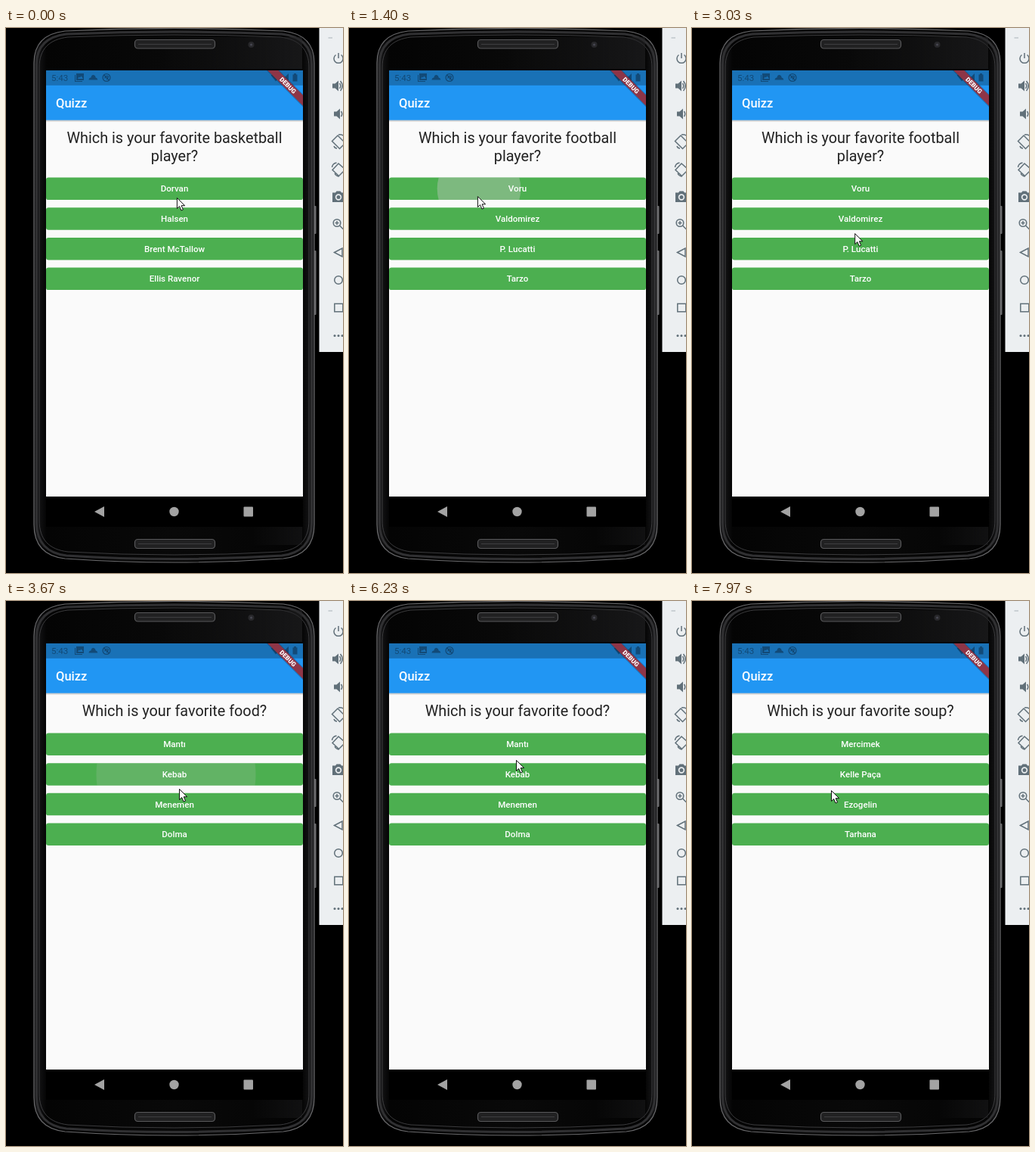
Write an HTML page that moves like this. It is 446 px wide and 720 px high and loops after 8000 ms.

```html
<!DOCTYPE html>
<html lang="en">
<head>
<meta charset="utf-8">
<title>Quizz</title>
<style>
html, body { margin: 0; width: 100%; height: 100%; overflow: hidden; background: #000; }
svg { display: block; width: 446px; height: 720px; }
text { font-family: Roboto, sans-serif; white-space: pre; }
.head { font-size: 19.83px; fill: #222; text-anchor: middle; }
.label { font-size: 11.57px; font-weight: 500; fill: #fff; text-anchor: middle; }
.tool { fill: none; stroke: #617079; stroke-width: 1.5; }
.solid { fill: #617079; }
.status { fill: #124a78; }
.thin { fill: none; stroke: #124a78; stroke-width: 1.3; }
</style>
</head>
<body>
<svg viewBox="0 0 446 720" xmlns="http://www.w3.org/2000/svg">
  <defs>
    <linearGradient id="body" x1="0" x2="1" y1="0" y2="0">
      <stop offset="0" stop-color="#1c1c1e"/>
      <stop offset=".045" stop-color="#040404"/>
      <stop offset=".5" stop-color="#090909"/>
      <stop offset=".955" stop-color="#040404"/>
      <stop offset="1" stop-color="#1c1c1e"/>
    </linearGradient>
    <linearGradient id="glare" x1="0" x2="1" y1="0" y2="0">
      <stop offset=".45" stop-color="#242426" stop-opacity="0"/>
      <stop offset="1" stop-color="#242426"/>
    </linearGradient>
    <linearGradient id="shade" x1="0" x2="0" y1="0" y2="1">
      <stop offset="0" stop-color="#555" stop-opacity=".4"/>
      <stop offset="1" stop-color="#555" stop-opacity="0"/>
    </linearGradient>
    <clipPath id="screen"><rect x="53" y="56" width="340" height="563"/></clipPath>
  </defs>
  <rect width="446" height="720"/>

  <!-- phone -->
  <g fill="#6c6c6e">
    <rect x="406" y="235" width="4.5" height="37" rx="1"/>
    <rect x="406" y="294" width="4.5" height="85" rx="1"/>
  </g>
  <path fill="url(#body)" stroke="#6a6a6c" stroke-width="1.2"
    d="M37 46C37 20 52 7 78 4Q222-3 367 4C393 7 408 20 408 46V656C408 684 393 698 367 701Q222 711 78 701C52 698 37 684 37 656Z"/>
  <path fill="none" stroke="#303032" stroke-width="3"
    d="M40.5 48C40.5 24 55 11 80 8Q222 2 365 8C390 11 404.5 24 404.5 48V654C404.5 680 390 694 365 697Q222 706 80 697C55 694 40.5 680 40.5 654Z"/>
  <path fill="none" stroke="#4a4a4c" stroke-width=".8"
    d="M44 52C44 28 57 15 82 12Q222 6 363 12C388 15 401 28 401 52V650C401 676 388 689 363 692Q222 700 82 692C57 689 44 676 44 650Z"/>
  <rect x="56" y="12" width="336" height="42" fill="url(#glare)" opacity=".6"/>
  <rect x="270" y="655" width="122" height="28" fill="url(#glare)" opacity=".4"/>
  <g fill="#212122" stroke="#58585a" stroke-width="1.2">
    <rect x="170.5" y="15.5" width="106" height="11.5" rx="4"/>
    <rect x="170.5" y="675.5" width="106" height="12" rx="4"/>
  </g>
  <path fill="none" stroke="#3e3e40" d="M175 21.5H272M175 681.5H272"/>
  <circle cx="324.5" cy="22" r="4" fill="#28282b"/>
  <circle cx="324.5" cy="22" r="1.6" fill="#464650"/>
  <rect x="53" y="619" width="340" height="40"/>
  <g fill="#a3a3a3">
    <path d="M117 639L130 632V646Z"/>
    <circle cx="222.5" cy="639" r="6.2"/>
    <rect x="314.5" y="632.5" width="12.5" height="13" rx="1"/>
  </g>

  <!-- app -->
  <g clip-path="url(#screen)">
    <rect x="53" y="56" width="340" height="563" fill="#fafafa"/>
    <rect x="53" y="121.5" width="340" height="3" fill="url(#shade)"/>
    <rect x="53" y="75" width="340" height="46.7" fill="#2196f3"/>
    <rect x="53" y="56" width="340" height="19.8" fill="#1971b6"/>
    <text x="66" y="104.9" font-size="16.53" font-weight="500" fill="#fff">Quizz</text>
    <g class="status">
      <text x="60" y="70" font-size="11.57">5:43</text>
      <path fill-rule="evenodd" d="M93 60H103V69H93ZM95 67H102L99.5 63.5L97.8 65.7L96.8 64.5ZM91 62H92V70H101V71H91Z"/>
      <path d="M109.5 68.5Q110 65.5 112.5 65.5Q113 61.5 116 62Q118.5 62.5 118.7 65.5Q121 66 121.3 68.5Z"/>
      <circle class="thin" cx="133" cy="65.5" r="4.9"/>
      <path class="thin" d="M129.5 62L136.5 69M130.5 66.5Q133 61.5 135.5 64.5L133 68"/>
      <path d="M350.5 62.5Q357 57.5 363.5 62.5L357 70.5Z"/>
      <path d="M374 60V70H364Z"/>
      <path d="M379.5 61.5H381V60H384V61.5H385.5V70.5H379.5Z"/>
    </g>
    <g id="page"></g>
    <g transform="translate(393 56) rotate(45)">
      <rect x="-34" y="22.3" width="68" height="11.8" fill="#000" opacity=".22"/>
      <rect x="-34" y="23.1" width="68" height="9.95" fill="#8e3547"/>
      <text y="31" text-anchor="middle" font-size="8.4" font-weight="900" fill="#fff">DEBUG</text>
    </g>
  </g>

  <!-- emulator toolbar -->
  <rect x="414.5" width="31.5" height="428" fill="#eceff1"/>
  <path d="M426.5 13H432" stroke="#a9b2b8"/>
  <g class="tool">
    <path d="M436.5 35.5A6 6 0 1 0 443.5 35.5M440 33V40"/>
    <path class="solid" stroke="none" d="M432 73.5H435.5L440 69.5V83.5L435.5 79.5H432Z"/>
    <path d="M441.5 73Q444 76.5 441.5 80M442.5 70Q448 76.5 442.5 83"/>
    <path class="solid" stroke="none" d="M434 110.5H437.5L442 106.5V120.5L437.5 116.5H434Z"/>
    <path d="M443.5 110Q446 113.5 443.5 117"/>
    <path d="M431.5 149.5L439 142L449 152L441.5 159.5ZM440 141Q446 140 449 145M434 156Q435 159 438 159"/>
    <path d="M432 187.5L440 179L449 187L440.5 195.5ZM431.5 184Q432 179 437.5 178M435 192Q437 196 441 196"/>
    <path class="solid" stroke="none" fill-rule="evenodd" d="M432 217.5H436L437.5 215.5H442.5L444 217.5H448V230H432ZM440 219.3A4.2 4.2 0 1 0 440 227.7A4.2 4.2 0 1 0 440 219.3Z"/>
    <circle class="solid" stroke="none" cx="440" cy="223.5" r="2.5"/>
    <circle cx="438" cy="257.5" r="4.8"/>
    <path d="M441.5 261L447 266.5M435.5 257.5H440.5M438 255V260"/>
    <path d="M434.5 296.5L445 291V302Z"/>
    <circle cx="440" cy="333" r="5.3"/>
    <rect x="434.8" y="364.3" width="11" height="10.5"/>
    <g class="solid" stroke="none">
      <circle cx="435" cy="406.5" r="1.5"/><circle cx="440" cy="406.5" r="1.5"/><circle cx="445" cy="406.5" r="1.5"/>
    </g>
  </g>
  <path id="cursor" fill="#fff" stroke="#111" stroke-linejoin="round" d="M.5 .5V14.5L3.7 11.5L6 17L8.5 16L6.2 10.7H10.7Z"/>
</svg>
<script>
const LOOP = 8000, CX = 223, PITCH = 39.67, ROW_H = 29.5;
const PRESS = 120, FADE = 200, SPREAD = .457;

const pages = [
  { from: 0, head: ["Which is your favorite basketball", "player?"],
    rows: ["Dorvan", "Halsen", "Brent McTallow", "Ellis Ravenor"] },
  { from: 1400, head: ["Which is your favorite football", "player?"],
    rows: ["Voru", "Valdomirez", "P. Lucatti", "Tarzo"] },
  { from: 3560, head: ["Which is your favorite food?"],
    rows: ["Mantı", "Kebab", "Menemen", "Dolma"] },
  { from: 7500, head: ["Which is your favorite soup?"],
    rows: ["Mercimek", "Kelle Paça", "Ezogelin", "Tarhana"] }
];

// a button is held for PRESS ms, then the next page shows
const taps = [
  { at: 1400 - PRESS, row: 0, x: 172 },
  { at: 3560 - PRESS, row: 1, x: 225 },
  { at: 7500 - PRESS, row: 0, x: 215 }
];

// time, x, y of the pointer tip
const path = [
  [0, 226, 224], [800, 183, 214], [1400, 170, 222], [2000, 137, 274],
  [2500, 206, 286], [2770, 206, 286], [2800, 214, 273], [3000, 214, 273],
  [3400, 229, 248], [3700, 229, 248], [4640, 213, 226], [4730, 145, 302],
  [4870, 145, 302], [5070, 163, 301], [6230, 221, 210], [6430, 222, 200],
  [6800, 222, 200], [7400, 214, 195], [7600, 210, 205], [7970, 184, 250],
  [LOOP, 184, 250]
];

const clamp = v => Math.max(0, Math.min(1, v));
const last = (list, key, t) => list.filter(o => o[key] <= t).pop();

function add(parent, tag, attrs, label) {
  const el = document.createElementNS("http://www.w3.org/2000/svg", tag);
  for (const k in attrs) el.setAttribute(k, attrs[k]);
  if (label) el.textContent = label;
  return parent.appendChild(el);
}

const root = document.getElementById("page");
const cursor = document.getElementById("cursor");

pages.forEach((page, p) => {
  const g = page.g = add(root, "g", {});
  page.head.forEach((line, i) =>
    add(g, "text", { class: "head", x: CX, y: 152.4 + i * 23.24 }, line));
  page.ripples = page.rows.map((name, i) => {
    const y = 151.4 + page.head.length * 23.1 + i * PITCH;
    const box = { x: 53, y, width: 340, height: ROW_H, rx: 3.2 };
    const clip = add(g, "clipPath", { id: `row${p}-${i}` });
    add(clip, "rect", box);
    add(g, "rect", { ...box, fill: "#4caf50" });
    const wave = add(g, "g", { "clip-path": `url(#row${p}-${i})`, fill: "#c8c8c8" });
    const disc = add(wave, "circle", { cx: CX, cy: y + ROW_H / 2, r: 0 });
    add(g, "text", { class: "label", x: CX, y: y + ROW_H / 2 + 4.1 }, name);
    return disc;
  });
});

function pointer(t) {
  const i = path.findIndex(k => k[0] > t);
  const [a, b] = [path[i - 1], path[i]];
  const u = (t - a[0]) / (b[0] - a[0]);
  return [a[1] + (b[1] - a[1]) * u, a[2] + (b[2] - a[2]) * u];
}

function draw(t) {
  const page = last(pages, "from", t);
  const tap = last(taps, "at", t);
  for (const p of pages) p.g.setAttribute("display", p === page ? "inline" : "none");
  page.ripples.forEach((disc, i) => {
    const age = tap && tap.row === i ? t - tap.at : LOOP;
    const fade = 1 - clamp((age - PRESS) / FADE);
    disc.setAttribute("cx", tap ? tap.x : CX);
    disc.setAttribute("r", fade ? age * SPREAD : 0);
    disc.setAttribute("opacity", .4 * fade);
  });
  cursor.setAttribute("transform", `translate(${pointer(t).map(v => v.toFixed(1))})`);
}

const start = performance.now();
function tick() {
  draw((performance.now() - start) % LOOP);
  requestAnimationFrame(tick);
}
draw(0);
requestAnimationFrame(tick);
</script>
</body>
</html>
```
